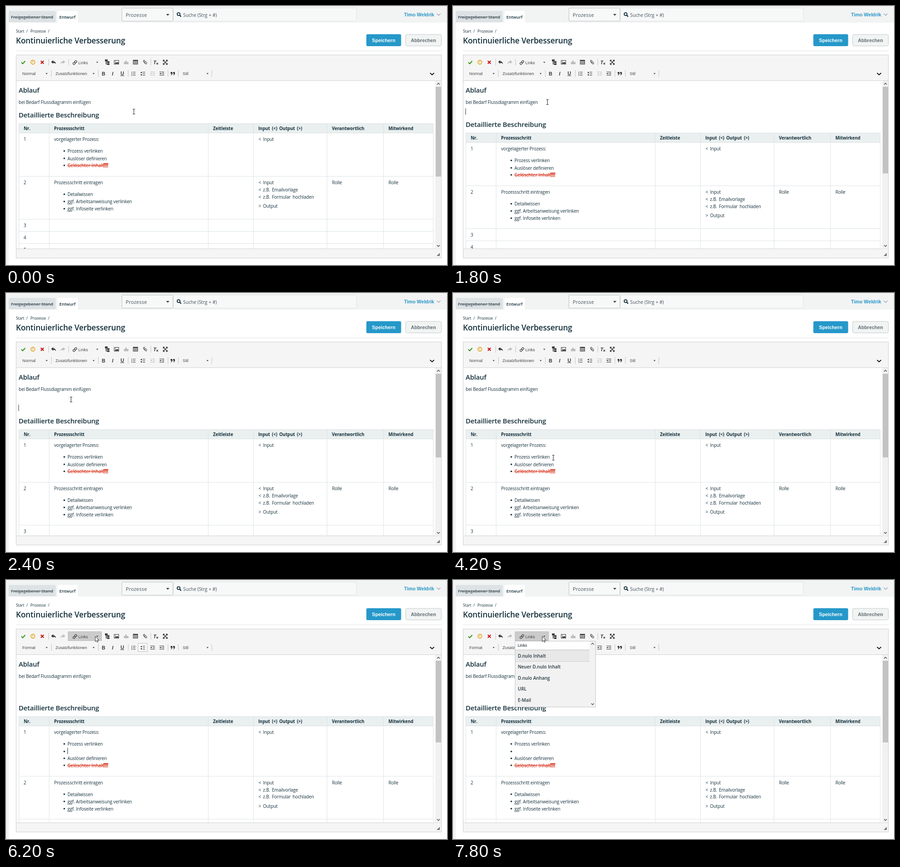
Animation, 976 px wide and 574 px high, one loop 8000 ms. Source, as an HTML page:

```html
<!DOCTYPE html>
<html lang="de">
<head>
<meta charset="utf-8">
<title>Prozess bearbeiten</title>
<style>
html, body { margin: 0; width: 100%; height: 100%; overflow: hidden; background: #fff; }
svg { display: block; width: 976px; height: 574px; }
text { font-family: "Open Sans", "Noto Sans", sans-serif; fill: #14303c; white-space: pre; }
.body { font-size: 9.9px; letter-spacing: -.11px; }
.th { font-size: 9.7px; font-weight: 700; letter-spacing: -.05px; }
.io { word-spacing: 1.8px; }
.h1 { font-size: 17.3px; font-weight: 600; letter-spacing: -.16px; }
.h2 { font-size: 14.9px; font-weight: 600; letter-spacing: -.15px; }
.crumb { font-size: 8.5px; letter-spacing: -.12px; }
.tab { font-size: 9.4px; font-weight: 600; }
.old { text-decoration: line-through; fill: #4c5b62; }
.field { font-size: 10.3px; fill: #40525a; }
.pick { font-size: 11px; letter-spacing: .2px; }
.ui, .btn { font-family: "Liberation Sans", Arial, sans-serif; }
.ui { font-size: 9.2px; fill: #484848; }
.btn { font-size: 10.7px; font-weight: 700; }
.item { font-size: 10px; font-weight: 600; fill: #26373f; }
.gone { fill: #d8341f; font-weight: 600; letter-spacing: -.08px; text-decoration: line-through; }
</style>
</head>
<body>
<svg id="stage" viewBox="0 0 976 574">
  <defs><clipPath id="page"><rect x="23" y="166" width="927" height="372"/></clipPath></defs>
</svg>
<script>
const stage = document.getElementById('stage');
const ui = {};
const INK = '#333', LINE = '#dde3e5';

function add(parent, tag, attrs, content) {
  const el = document.createElementNS('http://www.w3.org/2000/svg', tag);
  for (const key in attrs) el.setAttribute(key, attrs[key]);
  if (content) el.textContent = content;
  parent.appendChild(el);
  return el;
}
const group = (parent, attrs) => add(parent, 'g', attrs);
const text = (p, cls, x, y, str, fill) =>
  add(p, 'text', { class: cls, x, y, ...(fill && { style: 'fill:' + fill }) }, str);
const rect = (p, x, y, width, height, fill, more) =>
  add(p, 'rect', { x, y, width, height, fill, ...more });
const line = (p, d, stroke = INK, w = 1) =>
  add(p, 'path', { d, stroke, 'stroke-width': w, fill: 'none' });
const solid = (p, d, fill = INK) => add(p, 'path', { d, fill });
const dot = (p, cx, cy, r, fill = INK) => add(p, 'circle', { cx, cy, r, fill });
const drop = (p, x, y, s = 2.3) => solid(p, `M${x - s} ${y - s / 2}h${2 * s}l${-s} ${s + .2}z`);

function drawHeader() {
  rect(stage, 0, 0, 976, 574, '#fff');
  rect(stage, 0, 0, 976, 37, '#f2f3f3');
  rect(stage, 0, 0, 6, 574, '#f2f3f3');
  solid(stage, 'M6 36V14q0-3 3-3h98q3 0 3 3v22z', '#dde2e4');
  solid(stage, 'M114 37V14q0-3 3-3h39q3 0 3 3v23z', '#fff');
  text(stage, 'tab old', 11, 28, 'Freigegebener Stand');
  text(stage, 'tab', 118, 28, 'Entwurf');

  rect(stage, 370.5, 4.5, 405, 29, '#f7f8f8', { stroke: '#e1e4e5', rx: 2 });
  rect(stage, 256.5, 4.5, 113, 29, '#f7f8f8', { stroke: '#b9c2c5', rx: 1 });
  text(stage, 'field pick', 265, 23.5, 'Prozesse');
  drop(stage, 358, 19.5, 3.6);
  add(stage, 'circle', { cx: 382, cy: 18, r: 3.2, fill: 'none', stroke: '#14303c', 'stroke-width': 1.8 });
  line(stage, 'M384.4 20.4L387.6 23.6', '#14303c', 2.2);
  text(stage, 'field', 392, 23.5, 'Suche (Strg + #)');
  text(stage, 'btn', 881, 23, 'Timo Weldrik', '#2596c8');
  line(stage, 'M953.5 17l4 4 4-4', '#8fa0a7', 1.2);

  text(stage, 'crumb', 22, 59, 'Start');
  text(stage, 'crumb', 45, 59, '/');
  text(stage, 'crumb', 54, 59, 'Prozesse');
  text(stage, 'crumb', 93, 59, '/');
  text(stage, 'h1', 22, 83, 'Kontinuierliche Verbesserung');
  rect(stage, 797.5, 62.5, 77, 26.5, '#2598c9', { rx: 3 });
  text(stage, 'btn', 810, 80, 'Speichern', '#fff');
  rect(stage, 884.5, 63, 79, 25.5, '#f2f4f4', { rx: 3, stroke: '#c2c9cc' });
  text(stage, 'btn', 896, 80, 'Abbrechen', '#626d72');
  rect(stage, 22, 99, 942, 1, '#dfe3e5');
}

function drawFrame() {
  rect(stage, 22.5, 108.5, 941, 450, '#fff', { stroke: '#cdcdcd' });
  rect(stage, 23, 109, 940, 56, '#f5f5f5');
  rect(stage, 23, 165, 940, 1, '#d2d2d2');
  rect(stage, 23, 538, 940, 20, '#f5f5f5');
  rect(stage, 23, 537.5, 940, 1, '#d2d2d2');
  solid(stage, 'M960 547v7h-7z', '#777');
  rect(stage, 950, 166, 13, 372, '#f1f1f1');
  line(stage, 'M954 174l3-3 3 3M954 530l3 3 3-3', '#505050', 1.5);
}

const listLines = (p, x) => line(p, `M${x} 146.5h5.5M${x} 150h5.5M${x} 153.5h5.5`, INK, 1.2);

function indentIcon(p, x, dir, color) {
  const g = group(p);
  line(g, `M${x - 5} 146h10.5M${x + 1} 148.5h4.5M${x + 1} 151h4.5M${x - 5} 153.5h10.5`, color, 1.1);
  solid(g, `M${x - 2 + 2 * dir} 149.8l${-3 * dir} -2v4z`, color);
  line(g, `M${x - 5} 149.8h4`, color);
  return g;
}

function drawToolbar() {
  const bar = group(stage);
  for (const x of [94, 138, 320]) rect(bar, x, 117, 1, 15, '#c4c4c4');
  for (const x of [100, 204, 270, 358, 381, 455]) rect(bar, x, 142, 1, 15, '#c4c4c4');
  ui.hot = rect(bar, 137.5, 114.5, 74, 20, '#cbcbcb', { stroke: '#bdbdbd' });
  ui.listOn = rect(bar, 292.5, 140.5, 20, 18, '#fff', { stroke: '#bcbcbc' });

  line(bar, 'M34 125l3 3 5.5-6', '#36991a', 2.2);
  add(bar, 'circle', { cx: 59.5, cy: 124.5, r: 4.4, fill: 'none', stroke: '#e3a21a', 'stroke-width': 1.6 });
  line(bar, 'M59.5 121.8v3h-2', '#e3a21a', 1.1);
  line(bar, 'M77 121.5l6.5 6.5M83.5 121.5l-6.5 6.5', '#c8141c', 2.3);
  const undo = 'M100 124l4.5-4v2.5q5.5 0 6 6.5q-2-3.2-6-3.2v2.5z';
  solid(bar, undo);
  solid(bar, undo, '#bdbdbd').setAttribute('transform', 'translate(231 0) scale(-1 1)');

  const chain = group(bar, { transform: 'rotate(-45 152.5 125.5)' });
  for (const x of [147.5, 152.3])
    rect(chain, x, 123.3, 5.4, 4.2, 'none', { rx: 2.1, stroke: '#444', 'stroke-width': 1.3 });
  text(bar, 'ui', 160, 128.5, 'Links');
  drop(bar, 202, 125);

  rect(bar, 219, 118.5, 6, 4, INK);
  rect(bar, 224, 122.5, 5, 3.5, INK);
  rect(bar, 224, 127, 5, 3.5, INK);
  line(bar, 'M221.5 122v6.5h3M221.5 124.5h3', INK, 1.3);
  rect(bar, 239.5, 120.5, 10, 8.5, '#fff', { stroke: INK });
  solid(bar, 'M240.5 128l2.5-4 2 2 2-2.5 2.5 4.5z');
  dot(bar, 242.2, 122.8, .9);
  solid(bar, 'M261 124h3v-3h3v3h4v5h-10z', '#bcbcbc');
  rect(bar, 281, 119.5, 11, 10, INK);
  for (let i = 0; i < 9; i++)
    rect(bar, 282 + i % 3 * 3.2, 122 + Math.floor(i / 3) * 2.4, 2.4, 1.6, '#fff');
  line(bar, 'M304 123l4.5 5a1.7 1.7 0 0 0 2.6-2.3l-4.6-5a1.2 1.2 0 0 0-1.9 1.7l4 4.4', '#444', 1.1);
  text(bar, 'btn', 326, 128.5, 'T', INK).setAttribute('font-style', 'italic');
  line(bar, 'M333 126l3.5 3.5M336.5 126l-3.5 3.5', INK, 1.1);
  line(bar, 'M348 123v-3h3M354 120h3v3M357 126.5v3h-3M351 129.5h-3v-3M348.5 120.5l8 8.5M356.5 120.5l-8 8.5', INK, 1.3);

  ui.format = text(bar, 'ui', 36, 153, 'Normal');
  drop(bar, 90, 150);
  text(bar, 'ui', 109.5, 153, 'Zusatzfunktionen');
  drop(bar, 194, 150);
  text(bar, 'btn', 212, 153.5, 'B', INK);
  text(bar, 'btn', 234.5, 153.5, 'I', INK).setAttribute('font-style', 'italic');
  text(bar, 'btn', 253.5, 152.5, 'U', INK);
  rect(bar, 253, 154, 8.5, 1, INK);
  listLines(bar, 281);
  line(bar, 'M278.5 145.5v3M277.5 150h2M277.5 152h2M277.5 154h2', INK, .9);
  listLines(bar, 302.5);
  dot(bar, 299.5, 147.5, 1.5);
  dot(bar, 299.5, 152.5, 1.5);
  ui.outOff = indentIcon(bar, 324, -1, '#c2c2c2');
  ui.outOn = indentIcon(bar, 324, -1, '#444');
  indentIcon(bar, 344.5, 1, '#444');
  for (const x of [364, 369.5]) {
    dot(bar, x + 2.2, 148.2, 2.1);
    line(bar, `M${x + 3.8} 148q.3 3.5-2.8 5`, INK, 1.3);
  }
  text(bar, 'ui', 391, 153, 'Stil');
  drop(bar, 446, 150);
  line(bar, 'M938.5 148.5l4.5 4 4.5-4', '#111', 1.9);
}

function drawPage() {
  const page = group(stage, { 'clip-path': 'url(#page)' });
  text(page, 'h2', 28, 191.5, 'Ablauf');
  text(page, 'body', 28, 217, 'bei Bedarf Flussdiagramm einfügen');
  const low = ui.low = group(page);
  text(low, 'h2', 28, 247, 'Detaillierte Beschreibung');

  const edges = [28, 95, 447, 547, 710, 835, 945];
  rect(low, 28, 261, 917, 20, '#eaefef');
  for (const x of edges) rect(low, x, 260, 1, 400, LINE);
  rect(low, 28, 260, 918, 1, LINE);
  rect(low, 28, 281, 918, 1, LINE);
  const heads = ['Nr.', 'Prozessschritt', 'Zeitleiste', 'Input (<) Output (>)', 'Verantwortlich', 'Mitwirkend'];
  heads.forEach((h, i) => text(low, 'th io', edges[i] + 11.2, 275, h));

  const bullet = (p, y, str, cls = 'body') => {
    dot(p, 129, y - 3.8, 1.8, '#14303c');
    text(p, cls, 136, y, str);
  };
  text(low, 'body', 39, 299, '1');
  text(low, 'body', 106.5, 299, 'vorgelagerter Prozess:');
  text(low, 'body io', 559, 299, '< Input');
  bullet(low, 325, 'Prozess verlinken');
  ui.newDot = dot(low, 129, 338, 1.8, '#14303c');

  const rest = ui.rest = group(low);
  bullet(rest, 341.5, 'Auslöser definieren');
  bullet(rest, 357, 'Gelöschter Inhalt', 'body gone');
  rect(rest, 216, 348.5, 10, 9, '#f1ac9e');
  rect(rest, 215.5, 348.5, 11, 2, '#d8341f');
  rect(rest, 217, 352, 8, 1, '#d8341f');
  line(rest, 'M216.5 351v6.5h9V351', '#e58272', .8);
  for (const y of [377, 472, 499, 526]) rect(rest, 28, y, 918, 1, LINE);
  text(rest, 'body', 39, 395, '2');
  text(rest, 'body', 106.5, 395, 'Prozessschritt eintragen');
  ['Detailwissen', 'ggf. Arbeitsanweisung verlinken', 'ggf. Infoseite verlinken']
    .forEach((s, i) => bullet(rest, 421 + 16 * i, s));
  text(rest, 'body io', 559, 395, '< Input');
  text(rest, 'body io', 559, 411, '< z.B. Emailvorlage');
  text(rest, 'body io', 559, 426.5, '< z.B. Formular hochladen');
  text(rest, 'body io', 559, 447, '> Output');
  text(rest, 'body', 721.5, 395, 'Rolle');
  text(rest, 'body', 846.5, 395, 'Rolle');
  [3, 4, 5].forEach((n, i) => text(rest, 'body', 39, 490 + 27 * i, String(n)));

  ui.caret = rect(page, 0, 0, 1, 14, '#14303c');
  ui.thumb = rect(stage, 951, 179, 12, 199, '#c3c3c3');
}

function drawMenu() {
  const m = ui.menu = group(stage);
  rect(m, 137.5, 135.5, 178, 146, '#f2f2f2', { stroke: '#c4c4c4' });
  rect(m, 138, 136, 164, 19, '#fff');
  text(m, 'item', 143, 148, 'Links').style.fontSize = '8.3px';
  rect(m, 138, 155, 164, 25, '#e8e8e8');
  rect(m, 138, 154.5, 164, 1, '#b9b9b9');
  rect(m, 138, 180, 164, 1, '#cfcfcf');
  ['D.nulo Inhalt', 'Neuer D.nulo Inhalt', 'D.nulo Anhang', 'URL', 'E-Mail']
    .forEach((s, i) => text(m, 'item', 143.5, 172 + 24.4 * i, s));
  line(m, 'M306 143l3-3 3 3M306 273.5l3 3 3-3', '#505050', 1.4);
}

function drawPointers() {
  ui.beam = group(stage);
  line(ui.beam, 'M-2.5-5.5H-.5L0-5L.5-5.5H2.5M0-5V5M-2.5 5.5H-.5L0 5L.5 5.5H2.5', '#111');
  ui.arrow = group(stage);
  add(ui.arrow, 'path', {
    d: 'M.5 0v11.5l2.7-2.5 1.8 4.2 1.9-.8-1.8-4.1h3.6z',
    fill: '#fff', stroke: '#222', 'stroke-width': .9
  });
}

drawHeader();
drawFrame();
drawToolbar();
drawPage();
drawMenu();
drawPointers();

// Pointer path: time, x, y
const path = [
  [0, 283, 234], [200, 278, 231], [600, 216, 204], [1000, 209, 213], [1800, 209, 213],
  [2400, 144, 236], [2600, 144, 236], [3800, 222, 367], [4200, 222, 365],
  [4800, 226, 371], [5200, 226, 371], [6000, 199, 132], [6200, 197, 125], [8000, 197, 125]
];
// Text caret: time, x, top; without a place it is hidden
const carets = [
  [0], [800, 187, 206], [1200], [1600, 187, 206], [1800, 27.5, 227], [2000, 27.5, 247.5], [2800],
  [3400, 27.5, 247.5], [3800], [4000, 27.5, 247.5], [4200], [4400, 215, 356], [4800],
  [5200, 136, 372], [5800], [6000, 136, 372], [6400], [6800, 136, 372], [7200]
];
// Page layout: time, shift of the table, extra shift below the new bullet, thumb height
const layouts = [[0, 0, 0, 199], [1800, 21, 0, 192], [2000, 42, 0, 185.5], [5200, 42, 15.5, 181]];

const at = (table, t) => table.filter(row => row[0] <= t).pop();
const show = (el, on) => el.setAttribute('visibility', on ? 'visible' : 'hidden');
const move = (el, x, y) => el.setAttribute('transform', `translate(${x} ${y})`);

function pointer(t) {
  const i = path.findIndex(p => p[0] > t);
  const [t0, x0, y0] = path[i - 1], [t1, x1, y1] = path[i];
  const k = (t - t0) / (t1 - t0);
  return [Math.round(x0 + (x1 - x0) * k), Math.round(y0 + (y1 - y0) * k)];
}

function draw() {
  const t = Math.floor(performance.now() % 8000 / 200) * 200;

  const [x, y] = pointer(t), inPage = y > 166;
  show(ui.beam, inPage);
  show(ui.arrow, !inPage);
  move(inPage ? ui.beam : ui.arrow, x, y);

  const [, cx, cy] = at(carets, t);
  show(ui.caret, cx);
  if (cx) {
    ui.caret.setAttribute('x', cx);
    ui.caret.setAttribute('y', cy);
  }

  const [, shift, extra, thumb] = at(layouts, t);
  move(ui.low, 0, shift);
  move(ui.rest, 0, extra);
  show(ui.newDot, extra);
  ui.thumb.setAttribute('height', thumb);

  const inList = t >= 4400;
  ui.format.textContent = inList ? 'Format' : 'Normal';
  show(ui.listOn, inList);
  show(ui.outOn, inList);
  show(ui.outOff, !inList);
  show(ui.hot, t >= 6000);
  show(ui.menu, t >= 7200);
  requestAnimationFrame(draw);
}
draw();
</script>
</body>
</html>
```
